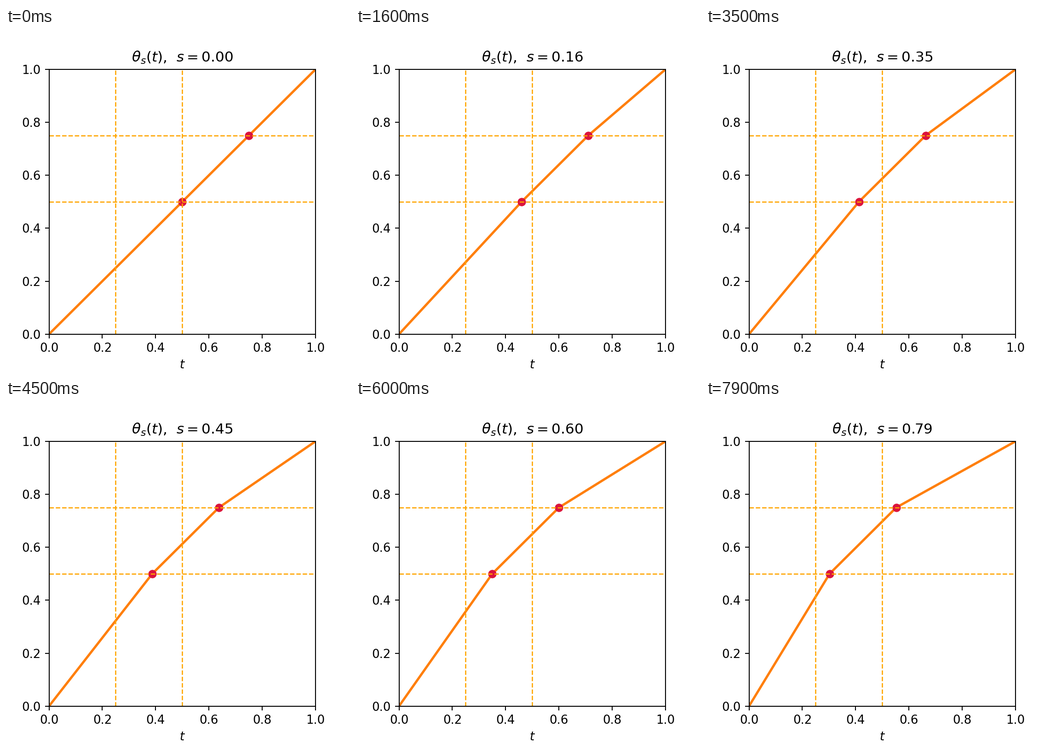
A matplotlib script for the animation above (8 s loop, 748x748 px).

```python
import matplotlib.pyplot as plt
from matplotlib.animation import FuncAnimation

FRAMES = 80
INTERVAL = 100  # ms

fig, ax = plt.subplots(figsize=(4, 4), dpi=187)
ax.set_xlim(0, 1)
ax.set_ylim(0, 1)
ax.set_xlabel("$t$")

curve, = ax.plot([], [], color="tab:orange", lw=2)
knots, = ax.plot([], [], "o", color="crimson", ms=6)

# Guides lie above the knots
guide = dict(color="orange", ls="--", lw=1)
for y in (0.5, 0.75):
    ax.axhline(y, **guide)
for x in (0.25, 0.5):
    ax.axvline(x, **guide)

title = ax.set_title("")


def update(i):
    s = i / 100
    xs = [0, 0.5 - s / 4, 0.75 - s / 4, 1]
    ys = [0, 0.5, 0.75, 1]
    curve.set_data(xs, ys)
    knots.set_data(xs[1:3], ys[1:3])
    title.set_text(rf"$\theta_s(t)$,  $s={s:.2f}$")
    return curve, knots, title


anim = FuncAnimation(fig, update, frames=FRAMES, interval=INTERVAL,
                     repeat=True, repeat_delay=0, blit=False)
plt.show()
```
